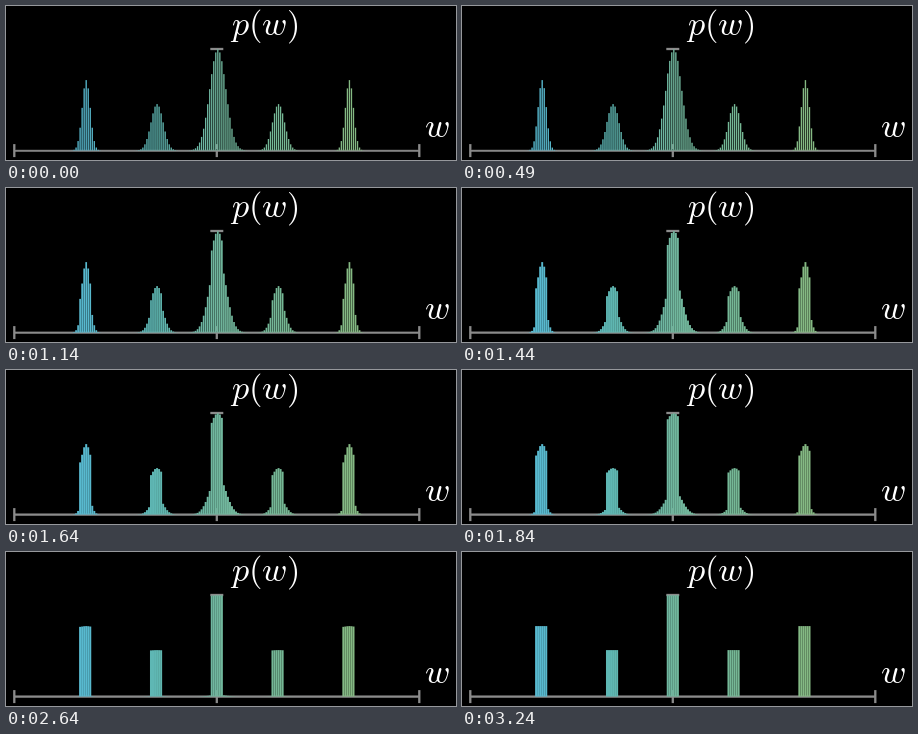
A matplotlib script that plays this animation: 450 px wide and 154 px high, repeating every 3440 ms.

```python
import numpy as np
import matplotlib.pyplot as plt
from matplotlib.animation import FuncAnimation
from matplotlib.collections import LineCollection, PolyCollection

W, H, DPI = 450, 154, 100
PX = 72 / DPI                     # points per pixel
LOOP, TICK = 3440, 10             # ms
RUN, LAST = 3000, 3240            # length of the morph, last picture change
X0, Y0, UNIT = 210.8, 144.6, 20.25
DX, GAP = 0.1, 0.7                # bar step in units, first gap in pixels
GRAY = "#8b8b8b"

# centre, height in pixels, gaussian sigma
PEAKS = [(-6.5, 70.5, 0.2), (-3, 46.5, 0.3), (0, 101.3, 0.4),
         (3, 46.5, 0.3), (6.5, 70.5, 0.2)]
STOPS = np.array([(88, 185, 207), (95, 183, 178), (113, 183, 158),
                  (117, 184, 150), (133, 185, 131)]) / 255

plt.rcParams["mathtext.fontset"] = "cm"

grid = np.arange(-100, 100) * DX
bells = sum(h * np.exp(-((grid - c) / s) ** 2 / 2) for c, h, s in PEAKS)
boxes = sum(h * ((grid > c - 0.35) & (grid < c + 0.25)) for c, h, _ in PEAKS)
left = X0 + grid * UNIT
right = left + DX * UNIT
centres = [p[0] for p in PEAKS]
colors = np.column_stack([np.interp(grid, centres, ch) for ch in STOPS.T])


def smooth(t, k=10):
    """Sigmoid easing, scaled to run exactly from 0 to 1."""
    sig = lambda x: 1 / (1 + np.exp(-x))
    err = sig(-k / 2)
    return np.clip((sig(k * (t - 0.5)) - err) / (1 - 2 * err), 0, 1)


def bar_shapes(heights, gap):
    a, b = left + gap / 2, right - gap / 2
    base = np.full_like(left, Y0)
    top = Y0 - heights
    xs = np.stack([a, a, b, b], axis=1)
    ys = np.stack([base, top, top, base], axis=1)
    return np.stack([xs, ys], axis=2)


fig = plt.figure(figsize=(W / DPI, H / DPI), dpi=DPI, facecolor="black")
ax = fig.add_axes([0, 0, 1, 1])
ax.set_xlim(0, W)
ax.set_ylim(H, 0)
ax.axis("off")

span = 10 * UNIT
axis_lines = [[(X0 - span, Y0), (X0 + span, Y0)], [(X0 - 6.5, 43), (X0 + 6.5, 43)]]
axis_lines += [[(x, Y0 - 6.5), (x, Y0 + 6.5)] for x in (X0 - span, X0, X0 + span)]
ax.add_collection(LineCollection(axis_lines, colors=GRAY, linewidths=2.3 * PX,
                                 snap=False, zorder=1))
shade, = ax.plot([X0 - span + 1.5, X0 + span - 1.5], [Y0 - 0.9] * 2,
                 color="black", snap=False, zorder=2)

bars = PolyCollection(bar_shapes(bells, GAP), facecolors=colors,
                      edgecolors="none", linewidths=0, snap=False, zorder=3)
ax.add_collection(bars)

for x, y, label in [(223.8, 28.3, "$p(w)$"), (418.2, 130.8, "$w$")]:
    ax.text(x, y, label, color="white", fontsize=34.3 * PX,
            ha="left", va="baseline", zorder=4)


def update(i):
    ms = i * TICK
    step = 0 if ms < 40 else min(40 + (ms - 40) // 50 * 50, LAST)
    s = smooth(min(step / RUN, 1))
    gap = GAP * (1 - s) ** 3
    bars.set_verts(bar_shapes(bells + (boxes - bells) * s, gap))
    shade.set_linewidth(gap * PX)
    return [bars, shade]


anim = FuncAnimation(fig, update, frames=LOOP // TICK, interval=TICK,
                     repeat=True, repeat_delay=0, blit=False)
plt.show()
```
